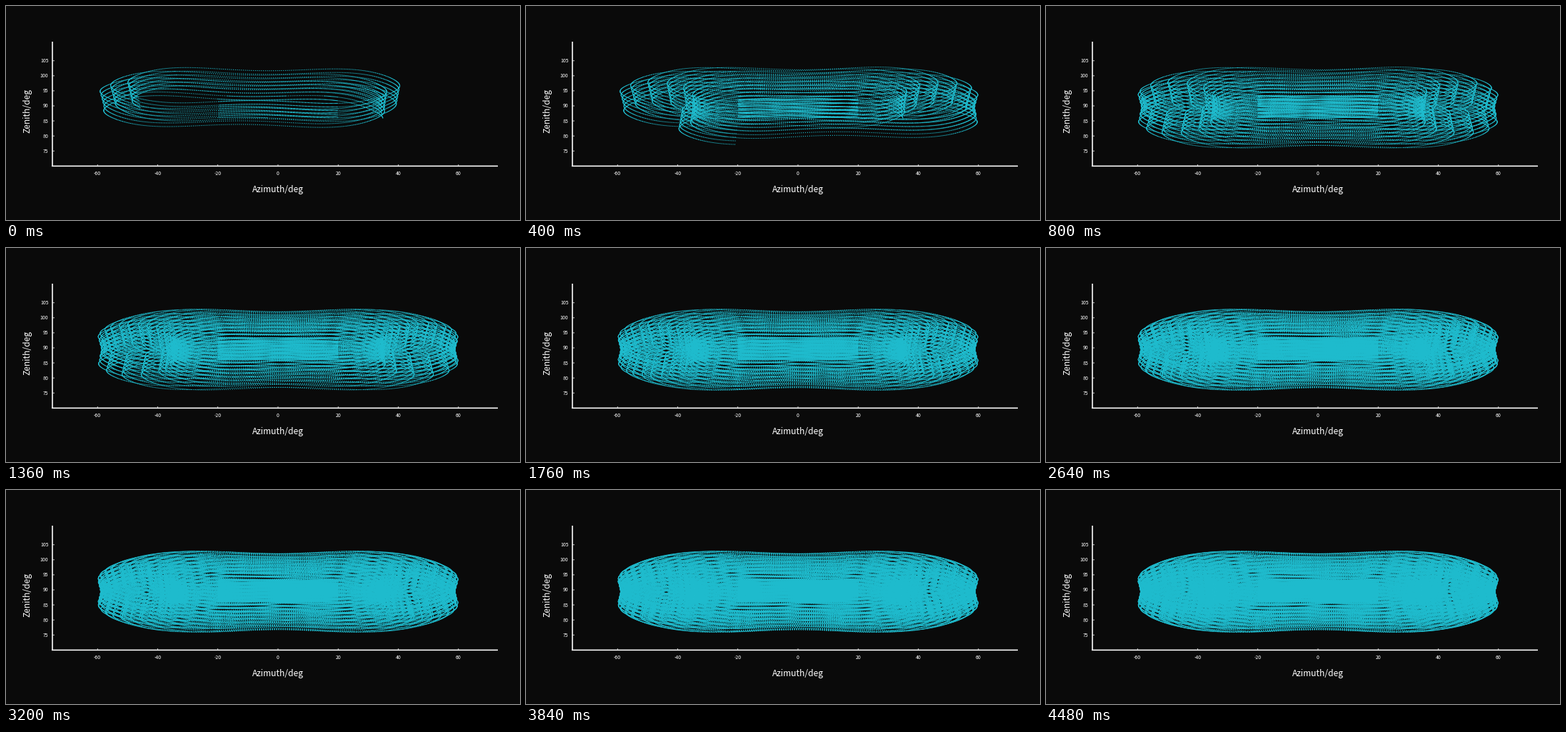
A matplotlib script that plays this animation: 720x300 px, repeating every 4.56 s.

```python
import numpy as np
import matplotlib.pyplot as plt
from matplotlib.animation import FuncAnimation

W, H, DPI = 720, 300, 100
FRAMES, INTERVAL = 57, 80
FIRST_LOOPS = 2.55           # sweeps already drawn at the start
LOOPS_PER_FRAME = 1.02
LOOPS_PER_TURN = 12.45       # sweeps in one turn of the slow rotor
SAMPLES = 880                # dense samples per sweep
SCALE = 4.213                # pixels per degree
X0, Y90 = 381, 140
BG = np.array([10, 10, 10]) / 255
TEAL = np.array([31, 188, 206]) / 255

plt.rcParams["font.family"] = "Noto Sans CJK JP"


def px(n):
    """Pixels to points."""
    return n * 72 / DPI


def to_x(az):
    return X0 + SCALE * az


def to_y(zen):
    return Y90 - SCALE * (zen - 90)


def scan(loops):
    """Azimuth and zenith of the six beams at the given sweep counts."""
    theta = 2 * np.pi * loops
    phi = np.radians(177 - 360 * loops / LOOPS_PER_TURN + 8 * np.cos(theta))

    x = 46.5 * np.cos(theta) + 12.3 * np.cos(phi)
    y = (5.93 * np.sin(theta) + 0.85 * np.sin(3 * theta)
         - 0.42 * np.sin(5 * theta) + 5 * np.sin(phi))
    y = y[:, None] + np.linspace(-3, 3, 6)
    x = x[:, None] * (1 + 0.005 * np.sqrt(y ** 2 + 0.5))
    return x, y + 89.4


def splat(x, y):
    """Spread small dots over a grid, as optical depth."""
    u, v = x - 0.5, y - 0.5
    i, j = np.floor(u).astype(int), np.floor(v).astype(int)
    fx, fy = u - i, v - j
    depth = np.zeros(W * H)
    for dx, wx in ((0, 1 - fx), (1, fx)):
        for dy, wy in ((0, 1 - fy), (1, fy)):
            alpha = np.minimum(1.2 * wx * wy, 0.95)
            depth += np.bincount((j + dy) * W + i + dx,
                                 -np.log(1 - alpha), W * H)
    return depth.reshape(H, W)


def drawn(frame):
    """Number of samples on the stage once a frame is complete."""
    if frame < 0:
        return 0
    return int(SAMPLES * (FIRST_LOOPS + LOOPS_PER_FRAME * frame))


def sweep_layer(frame):
    idx = np.arange(drawn(frame - 1), drawn(frame))
    az, zen = scan(idx / SAMPLES)
    fine = (np.abs(az) < 20) & (zen > 86) & (zen < 93.3)
    keep = fine | (idx % 2 == 0)[:, None]
    return splat(to_x(az[keep]), to_y(zen[keep]))


depths = np.cumsum([sweep_layer(i) for i in range(FRAMES)], axis=0)

fig = plt.figure(figsize=(W / DPI, H / DPI), dpi=DPI, facecolor=BG)
ax = fig.add_axes([0, 0, 1, 1])
ax.axis("off")
cloud = ax.imshow(np.tile(BG, (H, W, 1)), extent=(0, W, H, 0),
                  interpolation="nearest", aspect="auto")
ax.set(xlim=(0, W), ylim=(H, 0))


def line(xs, ys, width=1.6):
    ax.plot(xs, ys, color="white", lw=px(width), solid_capstyle="butt",
            snap=False)


def label(x, y, s, size, ha="center", **kw):
    ax.text(x, y, s, color="white", fontsize=px(size), ha=ha,
            va="baseline", **kw)


line([65, 65], [50, 225])
line([64, 689], [224.4, 224.4])
for az in range(-60, 61, 20):
    line([to_x(az)] * 2, [222, 224], 0.7)
    label(to_x(az), 237, str(az), 6.9)
for zen in range(75, 106, 5):
    line([65, 68], [to_y(zen)] * 2, 0.7)
    label(59.5, to_y(zen) + 2.5, str(zen), 6.9, ha="right")
label(381, 261, "Azimuth/deg", 12)
label(33, 147, "Zenith/deg", 12, rotation=90, rotation_mode="anchor")


def draw(frame):
    cover = 1 - np.exp(-depths[frame])[..., None]
    cloud.set_data(BG + (TEAL - BG) * cover)
    return (cloud,)


anim = FuncAnimation(fig, draw, frames=FRAMES, interval=INTERVAL,
                     repeat=True, repeat_delay=0)
plt.show()
```
